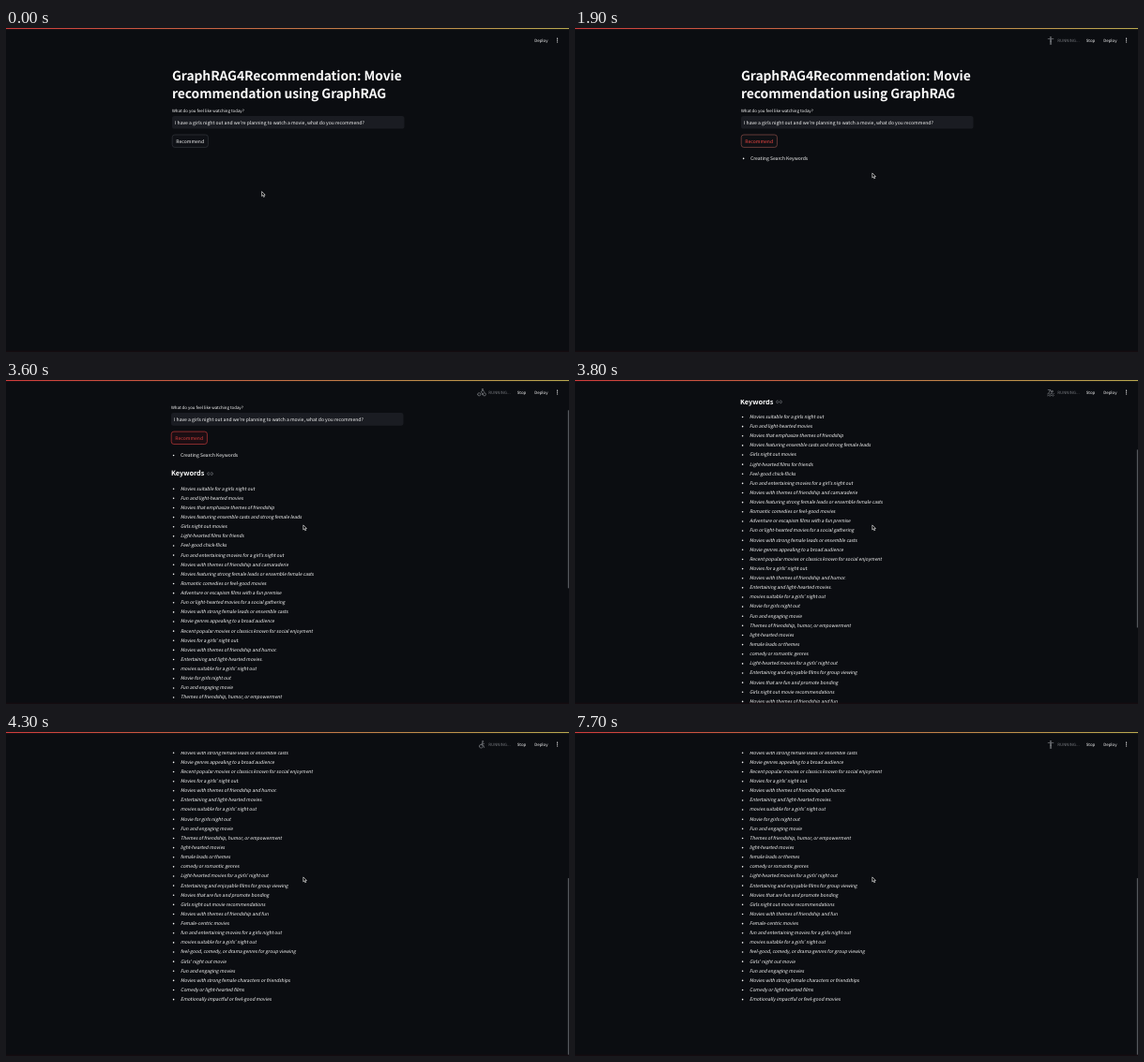
These frames come from a looping animation (600x346 px, 8 s). An HTML page:

```html
<!DOCTYPE html>
<html lang="en">
<head>
<meta charset="utf-8">
<title>GraphRAG4Recommendation</title>
<style>
html, body { margin: 0; width: 100%; height: 100%; overflow: hidden; background: #0b0d11; }
svg { display: block; width: 100vw; height: 100vh; }
text {
  font-family: 'Noto Sans CJK JP', 'Noto Sans CJK SC', 'Noto Sans CJK', 'Open Sans', sans-serif;
  font-size: 5.04px; fill: #fafafa; text-rendering: geometricPrecision; white-space: pre;
}
.title { font-size: 13.85px; font-weight: 700; letter-spacing: -.005em; }
.head { font-size: 7.3px; font-weight: 700; letter-spacing: -.005em; }
.small { font-size: 4.4px; }
.item { font-size: 5px; letter-spacing: -.05px; }
.pose { fill: none; stroke: #85888d; stroke-width: .65; stroke-linecap: round; stroke-linejoin: round; }
</style>
</head>
<body>
<svg id="stage" viewBox="0 0 600 346" preserveAspectRatio="none"></svg>
<script>
const LOOP = 8000, STEP = 100;
const ROW = 10.13, MAX_SCROLL = 284.5, VIEW = 346;
const KEYWORDS_AT = 2100, CLICK_AT = 700;

const keywords = `Movies suitable for a girls night out
Fun and light-hearted movies
Movies that emphasize themes of friendship
Movies featuring ensemble casts and strong female leads
Girls night out movies
Light-hearted films for friends
Feel-good chick-flicks
Fun and entertaining movies for a girl's night out
Movies with themes of friendship and camaraderie
Movies featuring strong female leads or ensemble female casts
Romantic comedies or feel-good movies
Adventure or escapism films with a fun premise
Fun or light-hearted movies for a social gathering
Movies with strong female leads or ensemble casts
Movie genres appealing to a broad audience
Recent popular movies or classics known for social enjoyment
Movies for a girls' night out.
Movies with themes of friendship and humor.
Entertaining and light-hearted movies.
movies suitable for a girls' night out
Movie for girls night out
Fun and engaging movie
Themes of friendship, humor, or empowerment
light-hearted movies
female leads or themes
comedy or romantic genres
Light-hearted movies for a girls' night out
Entertaining and enjoyable films for group viewing
Movies that are fun and promote bonding
Girls night out movie recommendations
Movies with themes of friendship and fun
Female-centric movies
fun and entertaining movies for a girls night out
movies suitable for a girls' night out
feel-good, comedy, or drama genres for group viewing
Girls' night out movie
Fun and engaging movies
Movies with strong female characters or friendships
Comedy or light-hearted films
Emotionally impactful or feel-good movies`.split('\n');

// Sport figures of the status icon, in order, drawn around (0, 0)
const ring = (x, y, r) => `M${x - r} ${y}a${r} ${r} 0 1 0 ${2 * r} 0a${r} ${r} 0 1 0 ${-2 * r} 0`;
const poses = [
  ring(1.2, -3.2, .6) + 'M.8 -2L-.3 .3L1.6 .6L2.6 3.2M.4 -1L2.4 -.9' + ring(-.7, 1.9, 1.9),
  ring(1, -3.3, .6) + 'M1 -2L-1 -.6L.6 .6L.3 2.4M1 -2L2.8 -1' + ring(-2.8, 2, 1.6) + ring(2.8, 2, 1.6),
  ring(1.8, -1.2, .7) + 'M-2.8 -2.8L-.4 -2.6L1 .2M-.4 -2.6L-2 .3M-3.4 1.5q.85 -.9 1.7 0t1.7 0t1.7 0t1.7 0M-3.4 3.4q.85 -.9 1.7 0t1.7 0t1.7 0t1.7 0',
  ring(1.2, -3.3, .6) + 'M.7 -2L-.4 .6L1.4 1.8L.9 4M-.4 .6L-1.4 2.4L-3.3 2.4M-2.4 -.4L-1.6 -1.7L.7 -2L2 -.4L3.2 -.8',
  ring(0, -3.2, .6) + 'M-2.6 -2.9L0 -1.6L2.6 -2.9M0 -1.6L0 .8L-1.3 4.2M0 .8L1.3 4.2',
  ring(0, -3.3, .6) + 'M-2.8 -1.7L2.8 -1.7M-.5 -1.5L-.6 4.2M.5 -1.5L.6 4.2M-.5 .9L.5 .9'
];
const poseTimes = [0, 200, 300, 500, 600, 900, 1100, 1300, 1500, 1600, 1800, 1900,
  2200, 2400, 2600, 2700, 2900, 3100, 3300, 3500, 3700, 3900, 4000, 4100,
  4300, 4600, 4700, 5000, 5100, 5300, 5600, 5800, 6000, 6200, 6400, 6500,
  6700, 6900, 7100, 7300, 7500, 7700];

const text = (x, y, s, cls = '', more = '') => `<text x="${x}" y="${y}" class="${cls}" ${more}>${s}</text>`;
const dot = (x, y, r) => `<circle cx="${x}" cy="${y}" r="${r}" fill="#fafafa"/>`;
const bullet = (y, s) => dot(179.6, y - 1.4, .8) +
  `<text class="item" transform="translate(187 ${y}) skewX(-11)">${s}</text>`;

const stage = document.getElementById('stage');
stage.innerHTML = `
<defs><linearGradient id="bar">
  <stop offset="0" stop-color="#cf3c3c"/><stop offset="1" stop-color="#b9a850"/>
</linearGradient></defs>
<rect width="600" height="346" fill="#0b0d11"/>
<g id="page">
  ${text(177, 55.9, 'GraphRAG4Recommendation: Movie', 'title')}
  ${text(177, 74.5, 'recommendation using GraphRAG', 'title')}
  ${text(177, 90, 'What do you feel like watching today?', 'small')}
  <rect x="177" y="94" width="247.5" height="13.6" rx="2.6" fill="#1a1c22"/>
  ${text(180, 102.6, "I have a girls night out and we're planning to watch a movie, what do you recommend?")}
  <rect id="button" x="177.2" y="114" width="38.2" height="13.4" rx="2.7" stroke-width=".7"/>
  ${text(181.3, 122.5, 'Recommend', '', 'id="label"')}
  <g id="creating">${dot(179.6, 139.4, .8)}${text(187, 140.8, 'Creating Search Keywords')}</g>
  <g id="results">
    ${text(177, 161.2, 'Keywords', 'head')}
    <path d="M217.6 157.6h-.6a1.4 1.4 0 0 0 0 2.8h.6M219.4 157.6h.6a1.4 1.4 0 0 1 0 2.8h-.6M217.3 159h2.4"
      fill="none" stroke="#85888d" stroke-width=".6"/>
    ${keywords.map((s, i) => bullet(176.5 + i * ROW, s)).join('')}
  </g>
</g>
<rect id="thumb" x="598.8" width="1.2" height="190" fill="#55585d"/>
<rect width="600" height="21" fill="#0b0d11"/>
<rect width="600" height="1.1" fill="url(#bar)"/>
<rect y="344.6" width="600" height="1.4" fill="#140c10"/>
<g id="status">
  <path id="pose" class="pose" transform="translate(507 13.3)"/>
  ${text(514.2, 14.8, 'RUNNING...', 'small', 'style="fill:#74777c"')}
  ${text(544.8, 14.8, 'Stop', 'small')}
</g>
${text(563.2, 14.8, 'Deploy', 'small')}
${[11.2, 13.1, 15].map(y => dot(587.6, y, .6)).join('')}
<path id="cursor" d="M0 0V5L1.2 3.9L2 5.9L2.9 5.5L2.1 3.6H3.6Z" fill="#000" stroke="#fff" stroke-width=".6"/>`;

const $ = id => document.getElementById(id);
const el = Object.fromEntries(
  ['page', 'button', 'label', 'creating', 'results', 'thumb', 'status', 'pose', 'cursor'].map(id => [id, $(id)]));

const ease = (t, a, b) => {
  const u = Math.min(1, Math.max(0, (t - a) / (b - a)));
  return u * u * (3 - 2 * u);
};
const mix = (a, b, u) => a + (b - a) * u;
const rgb = (a, b, u) => `rgb(${a.map((v, i) => Math.round(mix(v, b[i], u)))})`;
const show = (node, on) => node.setAttribute('visibility', on ? 'visible' : 'hidden');

function draw(time) {
  const t = Math.floor(time / STEP) * STEP;
  const loaded = t >= KEYWORDS_AT;
  const scroll = MAX_SCROLL * Math.pow(ease(t, 3200, 4300), 1.31);

  el.page.setAttribute('transform', `translate(${loaded ? -1 : 0} ${-scroll})`);
  el.thumb.setAttribute('y', scroll * VIEW / (VIEW + MAX_SCROLL));
  show(el.thumb, loaded);
  show(el.results, loaded);
  show(el.creating, t >= 1000);

  const hot = t >= 600, fade = ease(t, 2300, 2900);
  el.button.setAttribute('fill', hot ? rgb([15, 16, 20], [27, 14, 19], fade) : '#0f1116');
  el.button.setAttribute('stroke', hot ? rgb([140, 78, 72], [188, 56, 56], fade) : '#32353b');
  el.label.style.fill = hot ? rgb([250, 72, 68], [218, 62, 60], fade) : '#fafafa';

  show(el.status, t >= CLICK_AT);
  const last = poseTimes.filter(p => p <= t).length - 1;
  el.pose.setAttribute('d', poses[last % poses.length]);

  const go = ease(t, 0, 700), leave = ease(t, 1000, 1800);
  const x = mix(mix(272.6, 200, go), 316.8, leave);
  const y = mix(mix(174.6, 120, go), 154.9, leave);
  el.cursor.setAttribute('transform', `translate(${x} ${y})`);
}

const start = performance.now();
function tick() {
  draw((performance.now() - start) % LOOP);
  requestAnimationFrame(tick);
}
draw(0);
requestAnimationFrame(tick);
</script>
</body>
</html>
```
